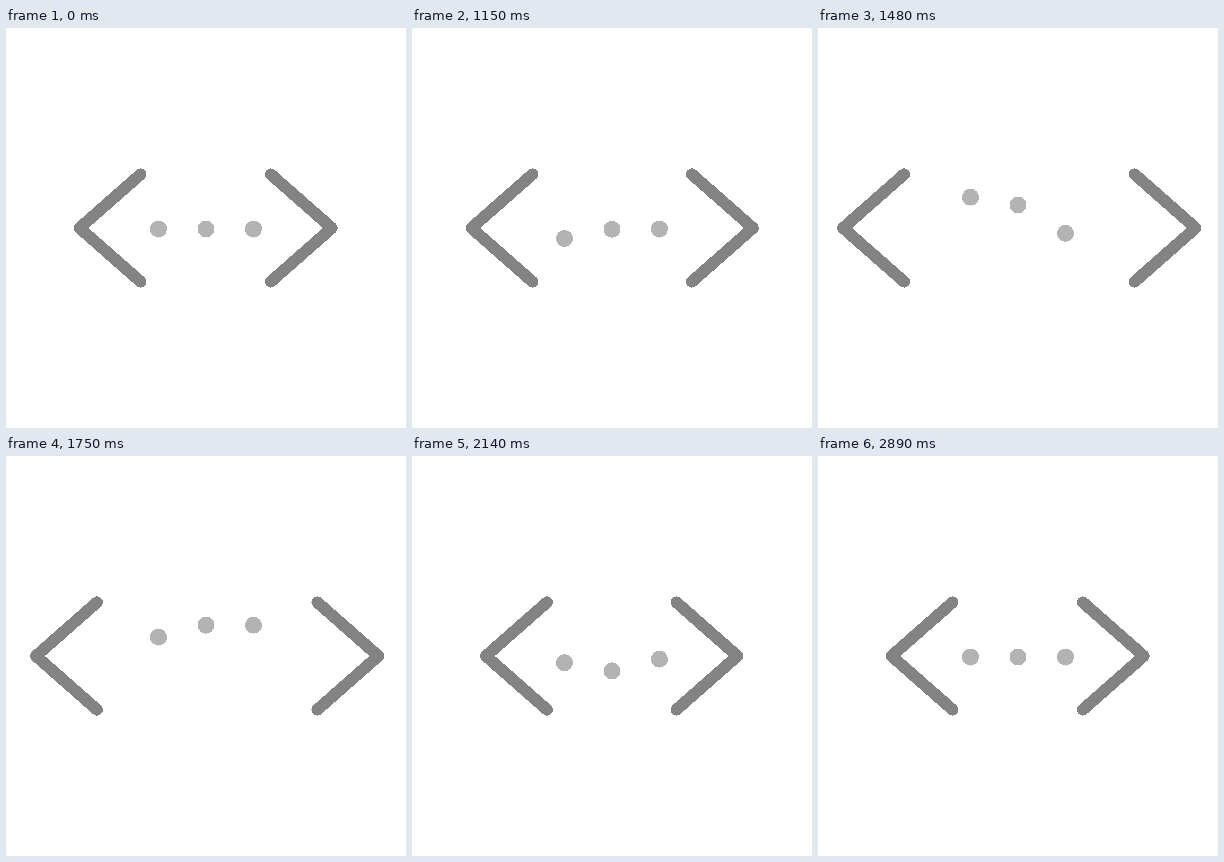
Write an HTML page that moves like this. It is 400 by 400 pixels and loops after 2.95 s.

```html
<!DOCTYPE html>
<html lang="en">
<head>
<meta charset="utf-8">
<title>Brackets and dots</title>
<style>
  html, body { margin: 0; width: 100%; height: 100%; overflow: hidden; background: #fff; }
  svg { display: block; width: 100vw; height: 100vh; shape-rendering: crispEdges; }
  .arrow { fill: none; stroke: #838383; stroke-width: 11.8; stroke-linecap: round; stroke-linejoin: round; }
  .dot { fill: #b3b3b3; }
</style>
</head>
<body>
<svg viewBox="0 0 400 400">
  <path class="arrow" id="left" d="M134.6 146.3l-61 53.7l61 53.7"/>
  <path class="arrow" id="right" d="M264.8 146.3l61 53.7l-61 53.7"/>
  <circle class="dot" cx="152.5" cy="201" r="8.5"/>
  <circle class="dot" cx="200" cy="201" r="8.5"/>
  <circle class="dot" cx="247.5" cy="201" r="8.5"/>
</svg>
<script>
  const LOOP = 2950, PAUSE = 1000, TICK = 30, STAGGER = 4.5;

  const left = document.getElementById('left');
  const right = document.getElementById('right');
  const dots = document.querySelectorAll('.dot');

  // Eased rise from 0 to 1 between two ticks
  function glide(tick, from, to) {
    const x = Math.min(1, Math.max(0, (tick - from) / (to - from)));
    return x * x * (3 - 2 * x);
  }

  // Open, hold, close a little too far, settle
  const spread = t => glide(t, 0, 14) - 1.16 * glide(t, 21, 43) + 0.16 * glide(t, 43, 52);

  // Dip, jump, hang, then fall and bounce out
  const hop = t => 9.5 * glide(t, 0, 5) - 41.3 * glide(t, 5, 14)
    + 45.8 * glide(t, 21, 33) - 19 * glide(t, 33, 44) + 5 * glide(t, 44, 54);

  const move = (el, x, y) => el.setAttribute('transform', `translate(${x} ${y})`);

  const start = performance.now();

  function draw() {
    const time = (performance.now() - start) % LOOP;
    const tick = Math.floor((time - PAUSE) / TICK);
    move(left, -48.5 * spread(tick), 0);
    move(right, 51.8 * spread(tick), 0);
    dots.forEach((dot, i) => move(dot, 0, hop(tick - i * STAGGER)));
    requestAnimationFrame(draw);
  }
  draw();
</script>
</body>
</html>
```
